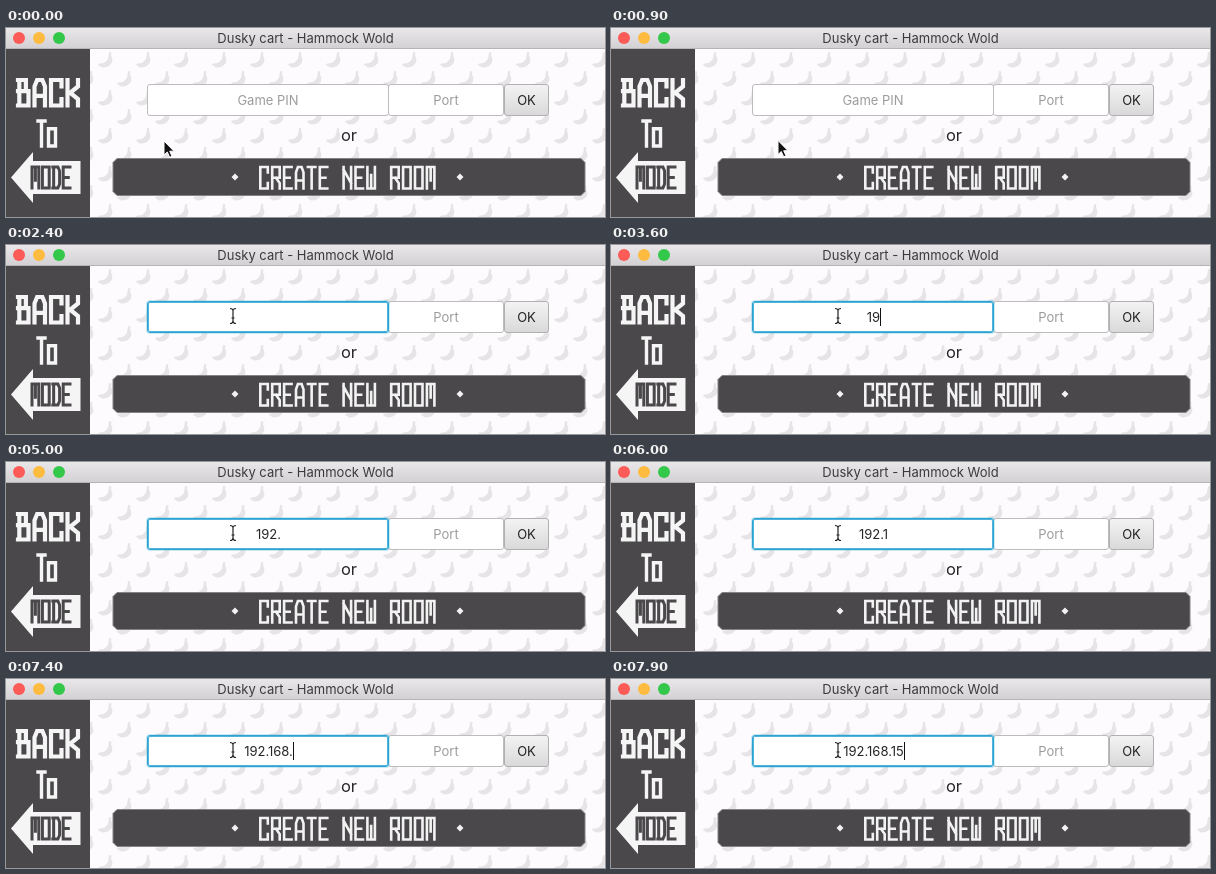
Write an HTML page that moves like this. It is 599 by 189 pixels and loops after 8000 ms.

```html
<!DOCTYPE html>
<html lang="en">
<head>
<meta charset="utf-8">
<title>Join a room</title>
<style>
html, body { margin: 0; width: 100%; height: 100%; overflow: hidden; }
body { position: relative; background: #fdfbfe; font: 13px Inter, "Open Sans", sans-serif; color: #262626; }
svg { position: absolute; left: 0; top: 0; }
.bar {
  position: absolute; left: 0; top: 0; width: 599px; height: 21px; box-sizing: border-box;
  background: linear-gradient(#e9e7e9, #d3d1d3); border-bottom: 1px solid #b6b4b6;
  text-align: center; line-height: 20px; color: #3c3a3c;
}
.light { position: absolute; top: 4px; width: 12px; height: 12px; border-radius: 50%; }
.box {
  position: absolute; top: 56px; height: 32px; box-sizing: border-box; line-height: 31px;
  text-align: center; white-space: pre; background: #fff; border: 1px solid #bcbcbc; border-radius: 3px;
}
.prompt { color: #9c9c9c; }
.focus { z-index: 1; padding-left: 1px; border-color: #2da3d2; box-shadow: inset 0 0 0 1px #4fb3da, 0 0 0 1px #039ed333; }
.ok { background: linear-gradient(#f3f3f3, #d9d9d9); border-color: #b0b0b0; color: #222; }
.or { position: absolute; left: 313px; top: 96px; width: 60px; text-align: center; font-size: 16.5px; line-height: 22px; }
#text { position: relative; }
#text.caret::after {
  content: ""; position: absolute; left: 100%; top: 50%; width: 1px; height: 18px; margin-top: -9px; background: #111;
}
#glyphs path { fill: none; vector-effect: non-scaling-stroke; stroke-linecap: square; }
#beam use { stroke: #222; stroke-width: 1.2; }
#beam use:first-child { stroke: #fff; stroke-width: 2.6; }
</style>
</head>
<body>
<svg width="599" height="189">
  <defs>
    <path id="banana" d="M11 0L13.500 .5L13 3.500C17 10 12 16 4 15.500L0 13L1 11.500C7 12 10.500 8 10.500 3.500z" fill="#e6e4e7"/>
    <pattern id="fruit" width="38" height="38" patternUnits="userSpaceOnUse" x="90" y="22">
      <use href="#banana" x="2" y="2"/>
      <use href="#banana" x="21" y="21"/>
    </pattern>
  </defs>
  <rect x="84" y="21" width="515" height="168" fill="url(#fruit)"/>
  <rect y="21" width="84" height="168" fill="#4a484b"/>
  <path d="M5 149.500L27 124V133H74.500V166H27V175Z" fill="#f6f5f6"/>
  <path d="M111 130.500H575L579 134.500V163.500L575 167.500H111L107 163.500V134.500Z" fill="#4a484b" stroke="#858386"/>
  <path d="M229 145.500l3.500 3.500-3.500 3.500-3.500-3.500zM454 145.500l3.500 3.500-3.500 3.500-3.500-3.500z" fill="#f3f2f3"/>
  <g id="glyphs"></g>
</svg>

<div class="bar">
  <i class="light" style="left:7px;background:#fc5b57"></i>
  <i class="light" style="left:27px;background:#fdbc40"></i>
  <i class="light" style="left:47px;background:#34c84a"></i>
  Dusky cart - Hammock Wold
</div>
<div class="box" id="pin" style="left:141px;width:242px"><span id="text"></span></div>
<div class="box prompt" style="left:382px;width:116px">Port</div>
<div class="box ok" style="left:498px;width:45px">OK</div>
<div class="or">or</div>

<svg width="599" height="189" style="z-index:2">
  <defs>
    <path id="ibar" d="M-3 -7.500Q0 -7.500 0 -5V5Q0 7.500-3 7.500M3 -7.500Q0 -7.500 0 -5M0 5Q0 7.500 3 7.500M-1.500 2H1.500"/>
  </defs>
  <path id="arrow" d="M0 0V14L3.300 11 5.700 16.300 8 15.300 5.700 10.200H10Z" fill="#111" stroke="#fff"/>
  <g id="beam" fill="none"><use href="#ibar"/><use href="#ibar"/></g>
</svg>

<script>
const $ = id => document.getElementById(id);
const LOOP = 8000, STEP = 100, FOCUS = 2100;

// Block lettering on a 4 by 8 grid
const GLYPHS = {
  A: "M0 8V2L1 0H3L4 2V8M0 5H4",
  B: "M0 0H3V3.5M0 3.5H4V8H0M.5 0V8",
  C: "M4 2V0H0V8H4V6",
  D: "M0 0H3L4 1.5V6.5L3 8H0M.5 0V8",
  E: "M4 0H0V8H4M0 4H3",
  K: "M0 0V8M4 0V2L1 4L4 6V8",
  M: "M0 8V0H4V8M2 0V5",
  N: "M0 8V0M4 8V0M0 1L4 6",
  O: "M0 0H4V8H0Z",
  R: "M0 8V0H4V4H0M2 4L4 6V8",
  T: "M0 0H4M2 0V8",
  W: "M0 0V8H4V0M2 8V3",
  o: "M0 2.5H4V8H0Z"
};

function letter(word, x, y, width, height, pitch, weight, color) {
  [...word].forEach((ch, i) => {
    if (!GLYPHS[ch]) return;
    const path = document.createElementNS("http://www.w3.org/2000/svg", "path");
    path.setAttribute("d", GLYPHS[ch]);
    path.setAttribute("transform", `translate(${x + i * pitch} ${y}) scale(${width / 4} ${height / 8})`);
    path.setAttribute("stroke", color);
    path.setAttribute("stroke-width", weight);
    $("glyphs").append(path);
  });
}
letter("BACK", 12, 52, 10.5, 25.5, 16.5, 4.2, "#f6f5f6");
letter("To", 32, 93, 7, 25, 10.5, 3.4, "#f6f5f6");
letter("MODE", 26, 139, 6.8, 21, 10.4, 3, "#4a484b");
letter("CREATE NEW ROOM", 254.3, 139, 7.5, 21.5, 11.9, 2.6, "#f3f2f3");

// [start, typed text, caret shown]
const TYPING = [
  [0, "", 0], [2200, "", 1], [2400, "", 0], [2700, "", 1], [3200, "", 0],
  [3400, "1", 1], [3500, "19", 1], [3700, "19", 0], [4000, "192", 0], [4200, "192", 1],
  [4500, "192.", 1], [5000, "192.", 0], [5400, "192.", 1], [5600, "192.1", 1],
  [6000, "192.1", 0], [6300, "192.1", 1], [6500, "192.16", 1], [6800, "192.16", 0],
  [7000, "192.168", 1], [7400, "192.168.", 1], [7600, "192.168.1", 1], [7900, "192.168.15", 1]
];

// [time, x, y] of the pointer
const PATH = [
  [0, 158, 113], [100, 160, 114], [300, 160, 114], [600, 162, 116], [800, 162, 116],
  [1000, 172, 109], [1200, 198, 91], [1400, 221, 75], [1600, 227, 71], [LOOP, 227, 71]
];

function pointer(t) {
  const i = PATH.findIndex(p => p[0] > t);
  const [t0, x0, y0] = PATH[i - 1], [t1, x1, y1] = PATH[i];
  const k = (t - t0) / (t1 - t0);
  return [x0 + (x1 - x0) * k, y0 + (y1 - y0) * k];
}

function draw(now) {
  const t = Math.floor(now % LOOP / STEP) * STEP;
  const focused = t >= FOCUS;
  const [, typed, caret] = TYPING.findLast(s => s[0] <= t);
  $("pin").className = focused ? "box focus" : "box prompt";
  // A zero-width space keeps the caret's line in the empty field
  $("text").textContent = focused ? typed || "\u200b" : "Game PIN";
  $("text").className = caret ? "caret" : "";

  const [x, y] = pointer(t), inField = y < 88;
  $("arrow").style.display = inField ? "none" : "";
  $("beam").style.display = inField ? "" : "none";
  $(inField ? "beam" : "arrow").setAttribute("transform", `translate(${x} ${y})`);
  requestAnimationFrame(draw);
}
requestAnimationFrame(draw);
</script>
</body>
</html>
```
